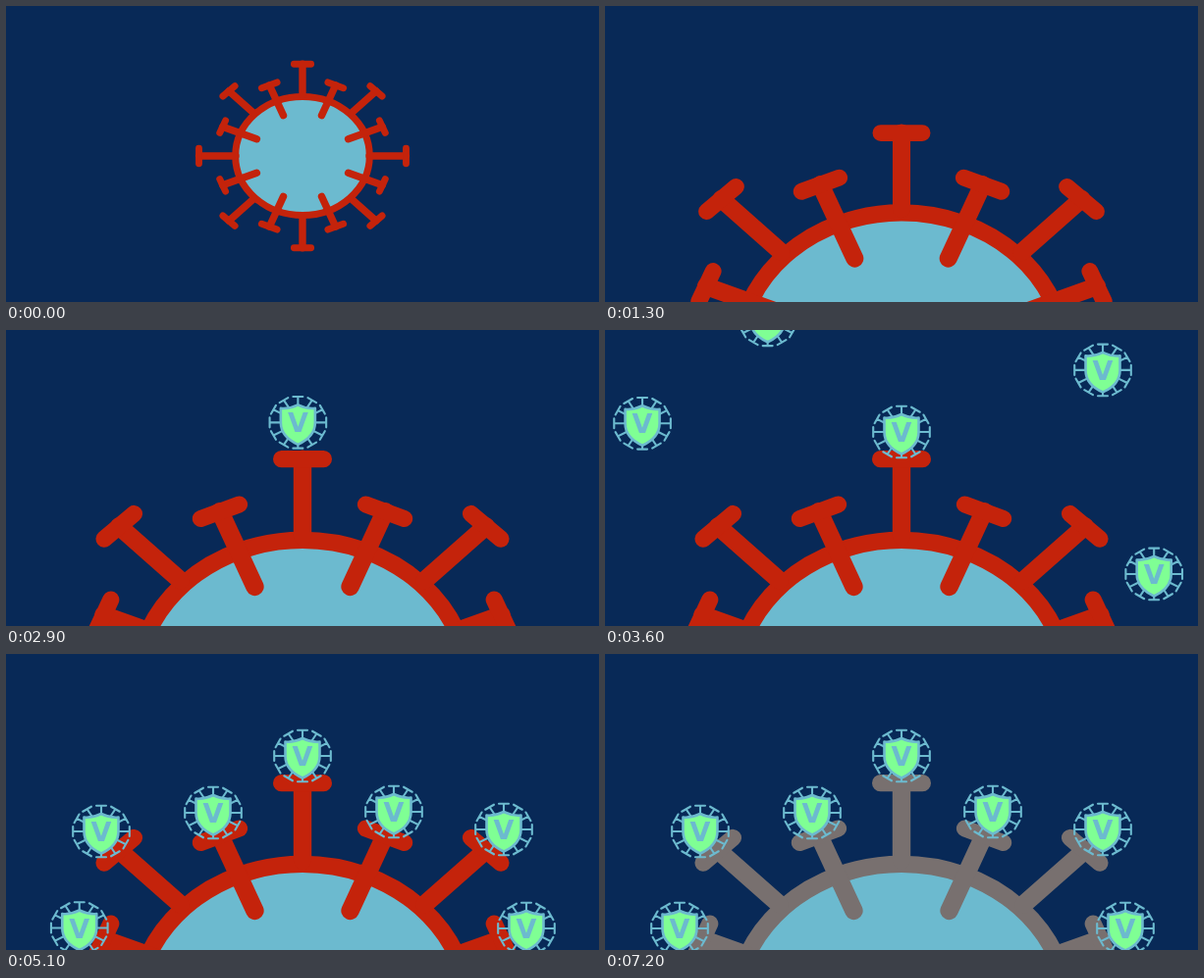
An HTML page for the animation above (7300 ms loop, 604x302 px).

```html
<!DOCTYPE html>
<html lang="en">
<head>
<meta charset="utf-8">
<title>Virus and vaccine</title>
<style>
html, body { margin: 0; width: 100%; height: 100%; overflow: hidden; background: #082957; }
svg { display: block; width: 100%; height: 100%; }
</style>
</head>
<body>
<svg viewBox="0 0 604 302">
  <defs>
    <g id="shot" stroke="#6cbacf">
      <path id="hooks" fill="none" stroke-width="2.1" stroke-linecap="round"/>
      <path d="M0-18Q-9-13.5-17.5-14.5V0C-17.5 11-10 18 0 22.5C10 18 17.5 11 17.5 0V-14.5Q9-13.5 0-18Z" fill="#7fff94" stroke-width="2.6" stroke-linejoin="round"/>
      <text y="10" text-anchor="middle" font-family="'DejaVu Sans', sans-serif" font-weight="bold" font-size="27" fill="#6cbacf" stroke="none">V</text>
    </g>
  </defs>
  <rect width="604" height="302" fill="#082957"/>
  <g id="virus" fill="none" stroke-linecap="round">
    <ellipse rx="68.3" ry="60.5" fill="#6cbacf" stroke-width="7"/>
    <path id="stems" stroke-width="7.4"/>
    <path id="bars" stroke-width="6.9"/>
  </g>
  <g id="shots"></g>
</svg>
<script>
const LOOP = 7300;
const $ = id => document.getElementById(id);
const line = (a, b, c, d) => `M${a} ${b}L${c} ${d}`;
const clamp = v => Math.min(1, Math.max(0, v));
const mix = (a, b, p) => a + (b - a) * p;
const ease = (t, from, to) => (1 - Math.cos(Math.PI * clamp((t - from) / (to - from)))) / 2;

// One quadrant of spikes: bar ends, then the inner end of the stem
const spikes = [
  [-8.6, -93.7, 8.6, -93.7, 0, -62],
  [-105.5, -7.7, -105.5, 7.7, -68, 0],
  [-81.1, -61, -68.9, -71.3, -50, -44],
  [-41.6, -69.3, -25.9, -75.1, -19.5, -41.4],
  [-78.4, -36.1, -84.3, -23.5, -46.6, -17.3]
];
let stems = "", bars = "";
for (const sx of [1, -1]) for (const sy of [1, -1])
  for (const [a, b, c, d, x, y] of spikes) {
    bars += line(a * sx, b * sy, c * sx, d * sy);
    stems += line((a + c) / 2 * sx, (b + d) / 2 * sy, x * sx, y * sy);
  }
$("stems").setAttribute("d", stems);
$("bars").setAttribute("d", bars);

let hooks = "";
for (let i = 0; i < 12; i++) {
  const a = i * Math.PI / 6, c = Math.cos(a), s = Math.sin(a);
  const x = 28.8 * c, y = 26.3 * s;
  hooks += line(18 * c, 17 * s, x, y) + line(x - 5 * s, y + 5 * c, x + 5 * s, y - 5 * c);
}
$("hooks").setAttribute("d", hooks);

// start time, end time, start point, end point, optional bend point
const flights = [
  [1850, 3200, [217, -32], [302, 104], [285, 66]],
  [2880, 3980, [640, 163], [530, 280]],
  [2960, 4160, [-35, -11], [97, 181]],
  [2728, 4800, [575, -32], [395, 161]],
  [3250, 4800, [152, -37], [211, 162], [212, 75]],
  [3900, 4950, [640, 60], [507, 179], [545, 85]],
  [3955, 5175, [-60, 228], [76, 280]]
].map(([from, to, a, b, bend]) => {
  const el = document.createElementNS("http://www.w3.org/2000/svg", "use");
  el.setAttribute("href", "#shot");
  $("shots").append(el);
  return { el, from, to, a, b, bend: bend || a.map((v, i) => (v + b[i]) / 2) };
});

const red = [196, 35, 11], grey = [120, 112, 111];

function draw(t) {
  const zoom = ease(t, 0, 1460);
  $("virus").setAttribute("transform", `translate(302 ${mix(153, 365, zoom)}) scale(${mix(1, 2.49, zoom)})`);
  const fade = clamp((t - 5100) / 1030);
  $("virus").setAttribute("stroke", `rgb(${red.map((v, i) => Math.round(mix(v, grey[i], fade)))})`);
  for (const { el, from, to, a, b, bend } of flights) {
    const p = ease(t, from, to);
    const [x, y] = a.map((v, i) => mix(mix(v, bend[i], p), mix(bend[i], b[i], p), p));
    el.setAttribute("transform", `translate(${x} ${y})`);
    el.setAttribute("visibility", t < from ? "hidden" : "visible");
  }
}

const begin = performance.now();
function tick() {
  draw((performance.now() - begin) % LOOP);
  requestAnimationFrame(tick);
}
tick();
</script>
</body>
</html>
```
